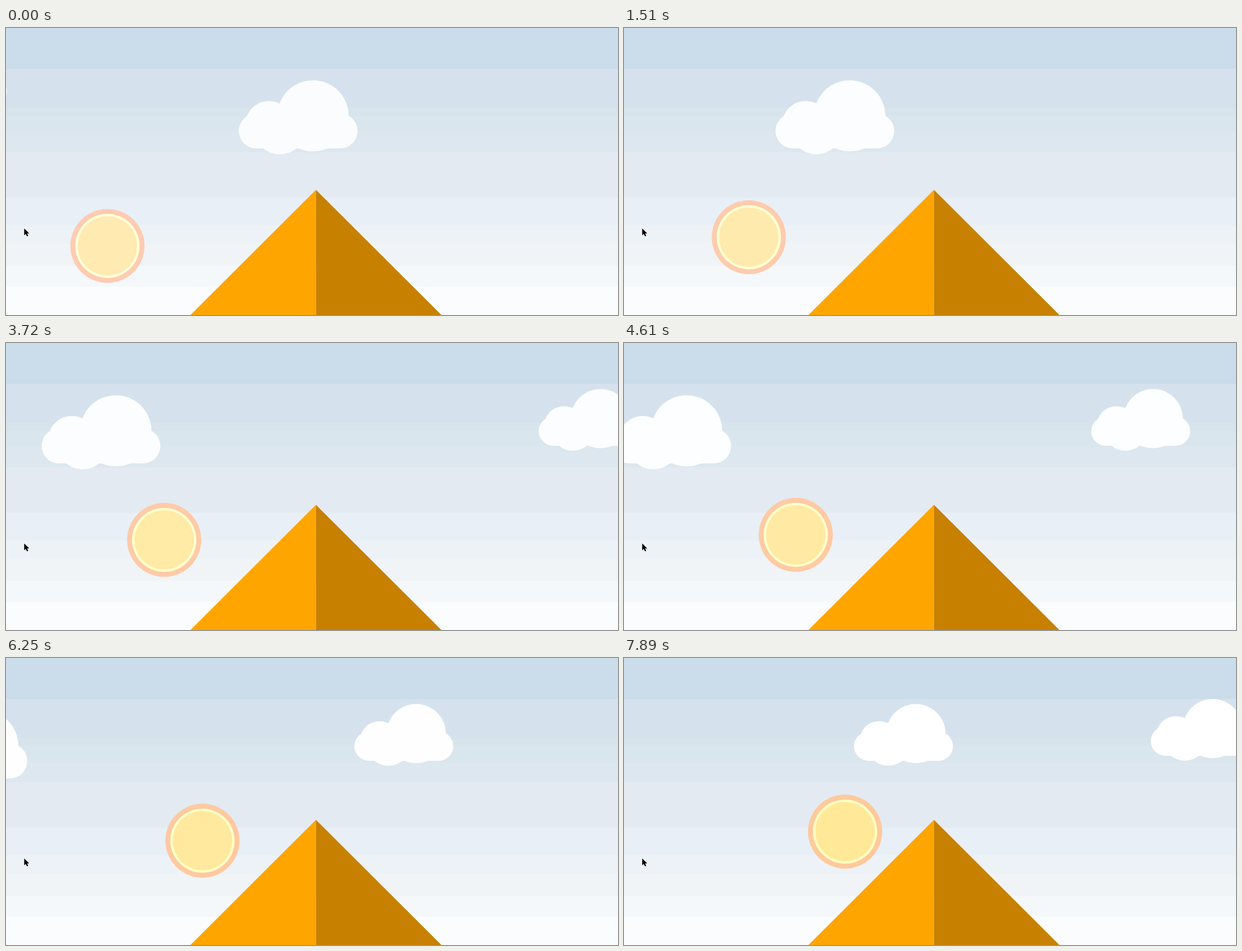
These frames come from a looping animation (1091 by 513 pixels, 8 s). An HTML page:

```html
<!DOCTYPE html>
<html lang="en">
<head>
<meta charset="utf-8">
<title>Pyramid at sunrise</title>
<style>
  html, body { margin: 0; width: 100%; height: 100%; overflow: hidden; background: #fafcfe; }
  svg { display: block; width: 100vw; height: 100vh; }
</style>
</head>
<body>
<svg viewBox="0 0 1091 513" preserveAspectRatio="none">
  <defs>
    <g id="cloud">
      <rect y="59.5" width="211.7" height="62.5" rx="31.25"/>
      <circle cx="54" cy="79.4" r="42.3"/>
      <circle cx="132.3" cy="63.7" r="63.5"/>
      <ellipse cx="73" cy="92.5" rx="44" ry="40"/>
    </g>
  </defs>
  <g id="sky" shape-rendering="crispEdges"></g>
  <g id="sun">
    <circle id="halo" r="66.1"/>
    <circle id="rim" r="57.3"/>
    <circle id="disc" r="53"/>
  </g>
  <path d="M552.5 289.3L328 513.8H552.5Z" fill="#ffa500"/>
  <path d="M552.5 289.3L777 513.8H552.5Z" fill="#c88000"/>
  <g id="clouds"></g>
  <path d="M32.4 358.2v12.6l2.9-2.7 2 4.5 2.3-1-2-4.3h3.9z" fill="#000" stroke="#fff" stroke-width="1.6" stroke-linejoin="round" paint-order="stroke"/>
</svg>
<script>
const LOOP = 8000;
const NS = 'http://www.w3.org/2000/svg';
const $ = id => document.getElementById(id);

function add(parent, tag, attrs) {
  const el = document.createElementNS(NS, tag);
  for (const key in attrs) el.setAttribute(key, attrs[key]);
  return parent.appendChild(el);
}

// Sky bands: top edge and colour.
const bands = [
  [0, '#cbddea'], [66, '#cadce8'], [73, '#d5e2ee'], [143, '#d8e4ec'],
  [157, '#dae6ee'], [185, '#dce7ef'], [222, '#e3eaf1'], [303, '#e8eff6'],
  [353, '#edf2f6'], [385, '#f0f4f7'], [425, '#f4f8fb'], [462, '#fafcfe']
];
bands.forEach(([y, fill], i) => {
  const end = i + 1 < bands.length ? bands[i + 1][0] : 513;
  add($('sky'), 'rect', { y, width: 1091, height: end - y, fill });
});

// Each cloud: left edge x at time t, top y, scale and speed in px/ms.
const clouds = [
  { x: -175, t: 0, y: 37, scale: 5 / 6, speed: 0.131 },
  { x: 415, t: 0, y: 93.3, scale: 1, speed: 0.0945 },
  { x: 1080.5, t: 2720, y: 82, scale: 5 / 6, speed: 0.1309 },
  { x: 1055, t: 6956, y: 73, scale: 5 / 6, speed: 0.1309 }
];
for (const c of clouds) c.el = add($('clouds'), 'use', { href: '#cloud' });

// Playback pace: start time, held steps until the next entry, scene time.
const pace = [
  [0, 1, 0], [80, 12, 81], [1510, 7, 1534], [2130, 5, 2142],
  [2720, 4, 2720], [3280, 3, 3280], [3720, 13, 3720], [5650, 9, 5650],
  [7000, 6, 6956], [7890, 1, 7842], [LOOP, 1, 7950]
];

function sceneTime(t) {
  let k = 0;
  while (k < pace.length - 2 && t >= pace[k + 1][0]) k++;
  const [start, steps, from] = pace[k];
  const [end, , to] = pace[k + 1];
  const step = Math.floor((t - start) / (end - start) * steps + 1e-6);
  return from + (to - from) * step / steps;
}

function mix(a, b, p) {
  return `rgb(${a.map((v, i) => Math.round(v + (b[i] - v) * p))})`;
}

function draw(t) {
  const s = sceneTime(t);
  const p = Math.min(1, s / 7842);
  $('sun').setAttribute('transform', `translate(${180.8 + 0.0272 * s} ${389.5 - 0.0101 * s})`);
  $('halo').setAttribute('fill', mix([255, 203, 177], [255, 201, 155], p));
  $('rim').setAttribute('fill', mix([255, 255, 217], [255, 255, 193], p));
  $('disc').setAttribute('fill', mix([255, 234, 178], [255, 233, 153], p));
  $('clouds').setAttribute('fill', mix([250, 252, 254], [255, 255, 255], p));
  for (const c of clouds) {
    const x = c.x - c.speed * (s - c.t);
    c.el.setAttribute('transform', `translate(${x} ${c.y}) scale(${c.scale})`);
  }
}

const begin = performance.now();
function tick() {
  draw((performance.now() - begin) % LOOP);
  requestAnimationFrame(tick);
}
tick();
</script>
</body>
</html>
```
